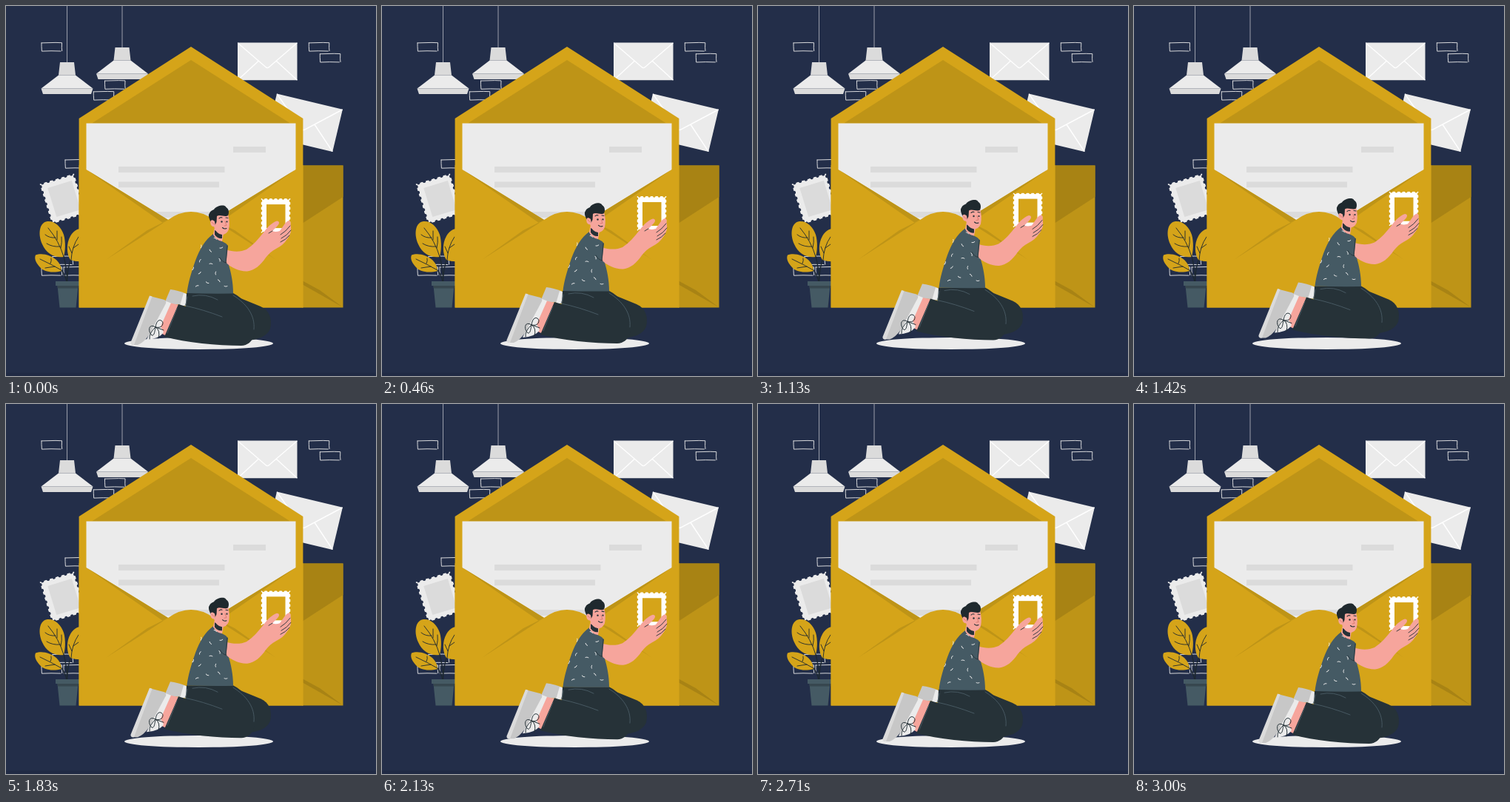
An HTML page that plays this animation: 500x500 px, repeating every 3040 ms.

```html
<!DOCTYPE html>
<html lang="en">
<head>
<meta charset="utf-8">
<title>Stamp on a letter</title>
<style>
  html, body { margin: 0; width: 100%; height: 100%; overflow: hidden; background: #232e49; }
  svg { display: block; width: 100vw; height: 100vh; }
  .line { fill: none; stroke-linecap: round; stroke-linejoin: round; }
</style>
</head>
<body>
<svg viewBox="0 0 500 500">
  <defs>
    <mask id="perforation" maskUnits="userSpaceOnUse" x="-22" y="-25" width="44" height="50">
      <rect x="-20" y="-23.33" width="40" height="46.66" fill="#fff"/>
      <rect x="-20" y="-23.33" width="40" height="46.66" fill="none" stroke="#000" stroke-width="3.600"
        stroke-linecap="round" stroke-dasharray="0 6.666" stroke-dashoffset="-3.333"/>
    </mask>
    <g id="stampPaper"><rect x="-20" y="-23.33" width="40" height="46.66" mask="url(#perforation)"/></g>
    <path id="brick" class="line" stroke="#ebebeb" stroke-width=".9" d="M0 .5 19 0 27.500 .3 27.300 7 27.700 11.200 M26 11.600 13 11.300 .4 11.700 0 5V.5"/>
    <g id="mail">
      <path fill="#ebebeb" d="M0 0H80.500V50.700H0Z"/>
      <path class="line" stroke="#fff" stroke-width="1.300" d="M.6 .6 38 33Q40.300 35 42.500 33L80 .6M.6 50.200 28 25M80 50.200 52.500 25"/>
    </g>
    <g id="lamp">
      <path stroke="#b9bcc4" stroke-width=".8" d="M0-90V0"/>
      <path fill="#ebebeb" d="M-11.500 17.500H11.500L35 35.500H-35Z"/>
      <path fill="#dbdbdb" d="M-9.500 0H9.500L11.500 17.500H-11.500ZM-35 35.500H35L32.500 43H-32.500Z"/>
    </g>
  </defs>

  <rect width="500" height="500" fill="#232e49"/>
  <rect y="495.500" width="500" height="4.500" fill="#202a44"/>
  <g id="bricks"></g>
  <use href="#lamp" x="82.500" y="76"/>
  <use href="#lamp" x="157" y="56"/>

  <g transform="translate(77 260.500) rotate(-17)">
    <use href="#stampPaper" fill="#ebebeb" transform="scale(1.220)"/>
    <rect x="-15.500" y="-20" width="34" height="41" fill="#dbdbdb"/>
  </g>

  <g id="plant">
    <path class="line" stroke="#1d2830" stroke-width="1.300" d="M83 373Q82 354 78 338M82.500 373Q83 354 88 341M82 373Q80 363 75 357"/>
    <g fill="#d5a419">
      <path d="M78 339C66 341 54 334 49 322 43 309 45 294 54 291.500 64 289 74 297 78 309 81 319 80 332 78 339Z"/>
      <path d="M87 343C82 336 81 321 87 311 91 304 96 301 104 300V345Q95 346 87 343Z"/>
      <path d="M75 358C64 361 51 360 45 352 40 346 38 341 40 336.500 49 333 61 337 68 343 73 348 75 353 75 358Z"/>
    </g>
    <path class="line" stroke="#1d2830" stroke-width=".9" d="M78 339Q72 318 57 300M73 325Q63 326 55 321M74 327Q76 319 75 312M67 313Q59 314 53 309M69 316 69 304
      M88 343Q89 325 98 312M89 334 85 325M91 327 98 322M75 357Q61 349 46 342M66 352 53 354M60 348Q62 344 61 341"/>
    <path fill="#455a64" d="M67 372H102V378H67ZM69.500 378H97.500L94.500 407.500H72.500Z"/>
    <path fill="#37474f" d="M69.500 378H97.500L97 381.500H70Z"/>
  </g>

  <use href="#mail" x="313" y="49.600"/>
  <use href="#mail" transform="translate(366 118.500) rotate(13.400) scale(1.135 1.160)"/>

  <path fill="#be9417" d="M400 215.500H455.500V407.500H400Z"/>
  <path fill="#a88314" d="M400 215.500H455.500V258L400 294ZM400 371 424 384 455 407 400 376Z"/>

  <path fill="#d5a419" d="M98.600 152 250 55 401.400 152V407.500H98.600Z"/>
  <path fill="#be9417" d="M250 73 384 158.500H116Z"/>
  <path fill="#ebebeb" d="M108.500 158.500H391.500V222L270 296H230L108.500 222Z"/>
  <path fill="#dbdbdb" d="M307 190H351V198H307ZM152 217H295.500V225H152ZM152 237.500H288V245.300H152ZM152 278H288V286H152Z"/>
  <path fill="#d5a419" d="M98.600 215 219 289Q234 278 250 278T281 289L401.400 215V407.500H98.600Z"/>
  <path fill="#be9417" d="M108.500 221 219 289 212 293ZM391.500 221 281 289 288 293ZM219 289 191 303 135 343ZM281 289 309 303 365 343Z"/>
  <ellipse cx="260.500" cy="456" rx="100.500" ry="8" fill="#ebebeb"/>

  <g id="man">
    <g transform="translate(364.500 283.400)">
      <use href="#stampPaper" fill="#fff"/>
      <rect x="-12.500" y="-15.300" width="25.500" height="32" fill="#d5a419"/>
    </g>

    <g id="farShoe">
      <path fill="#c7c7c7" d="M222 383Q232 384 243 388.500L240 404 214 402Z"/>
      <path fill="#ebebeb" d="M240 388 247 390 243 405H235Z"/>
    </g>

    <g id="nearShoe">
      <path fill="#f6a59c" d="M220 401 234 404 217 446 205 440Z"/>
      <path fill="#ebebeb" d="M214 398 223 401.500 209 433 213 441Q207 450 190 451Z"/>
      <path fill="#c7c7c7" d="M194.500 392 214 397Q217 398 216 402L193 445Q186 455 178 458H170Z"/>
      <path fill="#dbdbdb" d="M194 391.500 197.500 392.500 173 458Q168 458.500 168.500 454.500Z"/>
      <path class="line" stroke="#263238" stroke-width="1" d="M202 434C193 428 191 439 197 445 201 446 201 438 202 434
        C204 421 211 424 212 428 212 434 207 435 202 434Q209 438 206 449M202 434Q193 442 194 450M202 434 213 438"/>
    </g>

    <g id="trousers" fill="#263238">
      <path d="M300 388 344 406C356 411 360 423 357 436 352 448 338 452 320 452Z"/>
      <path d="M244 388 307 388C320 395 333 407 336 422 339 441 335 458 318 459 285 459 244 455 214 447L233 403 243 406Z"/>
      <path class="line" stroke="#50636c" stroke-width=".8" d="M307 391C325 402 337 418 335 437M245 393Q244 401 242 405Q266 410 292 420M252 392Q270 388 286 397M231 409 218 442"/>
    </g>

    <g id="arm">
      <path fill="#f6a59c" d="M297 329C308 333 318 332 325 329 334 323 341 315 348 306 353 299 359 293 366 290.500
        370 291 370 294 366 298L360 304Q364 306 370 304C374 299 377 292 382 290Q385 290 384.500 295
        C386 302 385 309 380 315 376 321 371 325 365 328 359 331 355 335 351 340 344 350 336 357.500 326 358.500 315 359 305 353 296 347Z"/>
      <path class="line" stroke="#263238" stroke-width=".9" d="M384 297Q378 305 371 309M385 303Q380 310 372 314M383 310Q378 316 371 319M360 304 355 307"/>
    </g>

    <g id="shirt">
      <path fill="#455a64" d="M280 308C269 316 262 328 256 344 250 361 246 375 244.500 388Q276 389 307 388.500
        C307 373 304 360 301 350L297.500 347 300 324Q297 320 292 318Z"/>
      <path class="line" stroke="#263238" stroke-width=".8" d="M298 347Q293 347 289 340M299 324 297 347"/>
      <g id="flecks" class="line" stroke="#ebebeb" stroke-width=".9"></g>
    </g>

    <g id="head">
      <path fill="#f6a59c" d="M282 299 294 307 292 318Q284 317 280 309Z"/>
      <path fill="#263238" d="M282 303 292 308V314Q286 315 282 309Z"/>
      <path fill="#f6a59c" d="M281 283Q291 277 300 281 303 292 301 302 298 309 292 309 284 308 281 298Z"/>
      <path fill="#1f292e" d="M277 292C274 287 273 282 275 280 276 277 279 276 281 275 283 271 290 269 294 269.500
        296 270 297 271 297.500 272 301 274 302 279 300 283 296 286 289 281 285 284L284.500 292 282 297Z"/>
      <path fill="#f6a59c" d="M282 291C277 287 275 291 277 296Q280 300 283 297Z"/>
      <path class="line" stroke="#263238" stroke-width="1.100" d="M288 287Q290 285 292 286M297 286 300 286.500M292.500 299.500Q295 302 298 300.500"/>
      <path class="line" stroke="#d77970" stroke-width=".9" d="M296 291 298 296.500 295 297M278 292 281 295"/>
      <g fill="#263238"><circle cx="291.500" cy="291.500" r="1.200"/><circle cx="298.500" cy="291.500" r="1.100"/></g>
    </g>
  </g>
</svg>
<script>
  const LOOP = 3040, FLOAT = 3000, LIFT = 10, STEP = 1000 / 24;
  const byId = id => document.getElementById(id);

  const bricks = [[48, 49.4], [133.5, 100.6], [118.3, 115.4], [80, 207.5], [409.3, 49.4], [424.3, 64.3], [63, 338], [48, 352.5], [78, 352.5]];
  byId('bricks').innerHTML = bricks.map(([x, y]) => `<use href="#brick" x="${x}" y="${y}"/>`).join('');

  const flecks = [[283, 314], [264, 325], [291, 327], [276, 331], [262, 344], [277, 348], [289, 343],
    [262, 361], [272, 374], [283, 361], [258, 378], [288, 371], [253, 355], [297, 379]];
  byId('flecks').innerHTML = flecks.map(([x, y], i) =>
    `<path d="M-2 .4Q0-.8 2 .4" transform="translate(${x} ${y}) rotate(${i * 67 + 30})"/>`).join('');

  const man = byId('man');
  const start = performance.now();

  // Linear rise and fall, stepped at 24 pictures a second.
  function draw(now) {
    const time = Math.max(0, now - start) % LOOP;
    const t = Math.min(FLOAT, Math.floor((time + 5) / STEP) * STEP);
    const rise = LIFT * (1 - Math.abs(2 * t / FLOAT - 1));
    man.setAttribute('transform', `translate(0 ${-rise})`);
    requestAnimationFrame(draw);
  }
  draw(start);
</script>
</body>
</html>
```
